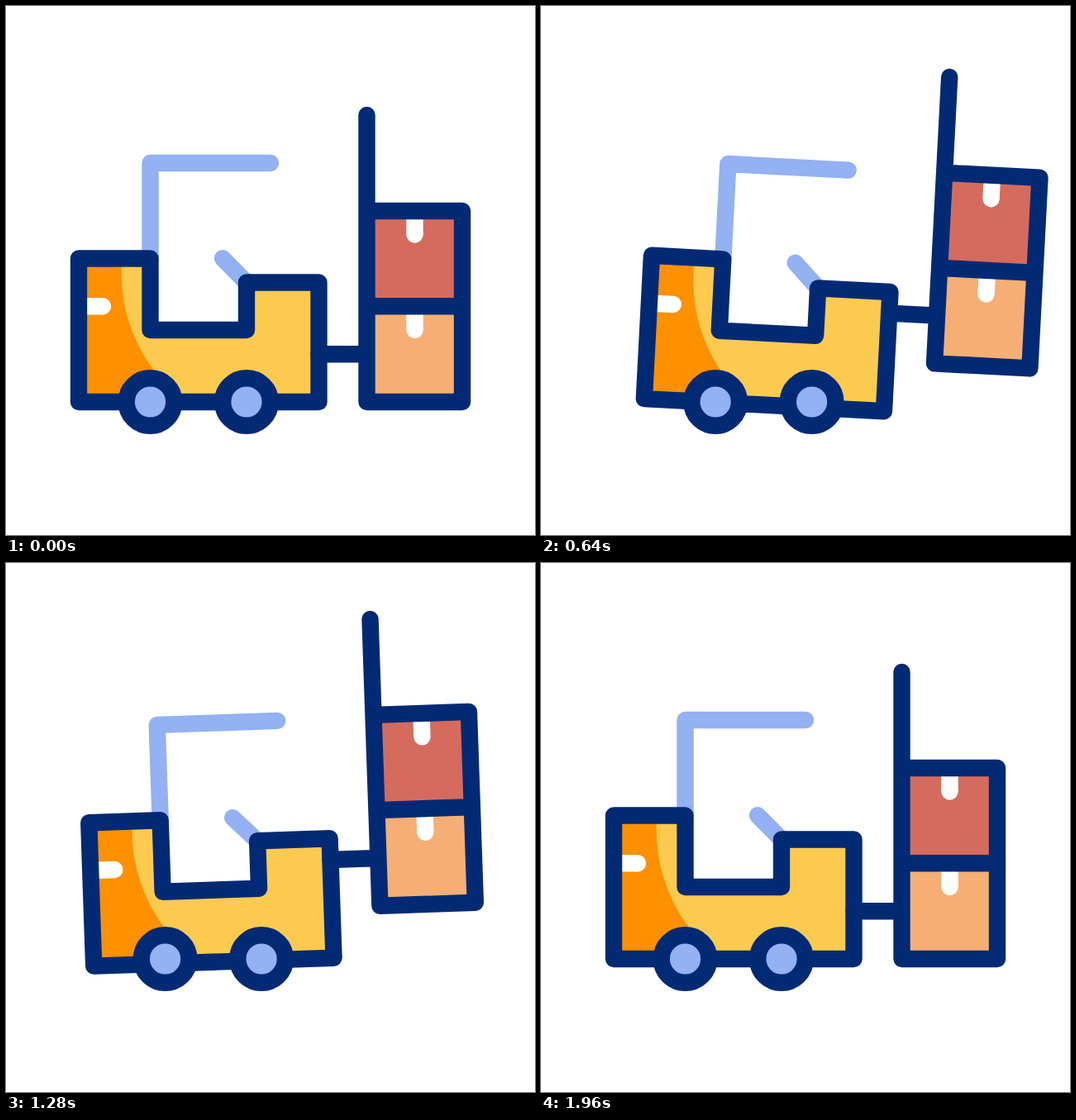
Recreate the animation shown at these times as an HTML page. Size 640 px wide and 640 px high, loop 2000 ms.

```html
<!DOCTYPE html>
<html lang="en">
<head>
<meta charset="utf-8">
<title>Forklift</title>
<style>
  html, body { margin: 0; width: 100%; height: 100%; overflow: hidden; background: #fff; }
  svg { display: block; width: 100%; height: 100%; }
  .line { fill: none; stroke: #022a74; stroke-width: 20.4; stroke-linecap: round; stroke-linejoin: round; }
  .sky { stroke: #93b1f3; }
  .tag { fill: none; stroke: #fff; stroke-width: 20.4; }
  .wheel { fill: #93b1f3; stroke: #022a74; stroke-width: 20.4; }
</style>
</head>
<body>
<svg viewBox="0 0 640 640">
  <defs>
    <path id="hull" d="M88 305.5H174.5V392H291V334.5H378.5V479H88Z"/>
    <clipPath id="inside"><use href="#hull"/></clipPath>
    <g id="label">
      <path class="tag" d="M494.5 0V19"/>
      <circle cx="494.5" cy="19" r="10.2" fill="#fff"/>
    </g>
    <circle id="wheel" class="wheel" cy="479" r="28.8"/>
  </defs>
  <g id="drive">
    <g id="tilt">
      <path class="line sky" d="M174.5 305.5V190H320M262 305.3L291 334.5"/>
      <use href="#hull" fill="#fdca50"/>
      <path clip-path="url(#inside)" fill="#ff9000" d="M88 300H140V312A195 195 0 0 0 179 441L206 479H88Z"/>
      <path class="tag" d="M90 363.3H117"/>
      <circle cx="117" cy="363.3" r="10.2" fill="#fff"/>
      <g id="lift">
        <path fill="#d56b5d" d="M436.5 248H552V363.3H436.5Z"/>
        <path fill="#f6ae74" d="M436.5 363.3H552V479H436.5Z"/>
        <use href="#label" y="257.5"/>
        <use href="#label" y="373"/>
        <path class="line" d="M436.5 132V479H552V248H436.5M436.5 363.3H552M378.5 421.2H436.5"/>
      </g>
      <use href="#hull" class="line"/>
    </g>
    <use href="#wheel" x="174.5"/>
    <use href="#wheel" x="291"/>
  </g>
</svg>
<script>
  const LOOP = 2000;
  const [drive, tilt, lift] = ['drive', 'tilt', 'lift'].map(id => document.getElementById(id));

  // Eased rise from 0 to 1 between two times
  function ramp(t, from, to) {
    const s = Math.min(1, Math.max(0, (t - from) / (to - from)));
    return s * s * (3 - 2 * s);
  }

  function pose(t) {
    const x = 40.8 * (ramp(t, 160, 760) - ramp(t, 980, 1540));
    const sag = 5 * (ramp(t, 140, 900) - ramp(t, 1100, 1640));
    const angle = 3 * ramp(t, 100, 600) - 5 * ramp(t, 660, 1150) + 2 * ramp(t, 1240, 1760);
    const height = 61 * (ramp(t, 124, 564) - ramp(t, 1400, 1840));

    drive.setAttribute('transform', `translate(${x} 0)`);
    tilt.setAttribute('transform', `translate(0 ${sag}) rotate(${angle} 233 479)`);
    lift.setAttribute('transform', `translate(0 ${-height})`);
  }

  const start = performance.now();

  function tick() {
    pose((performance.now() - start) % LOOP);
    requestAnimationFrame(tick);
  }
  tick();
</script>
</body>
</html>
```
